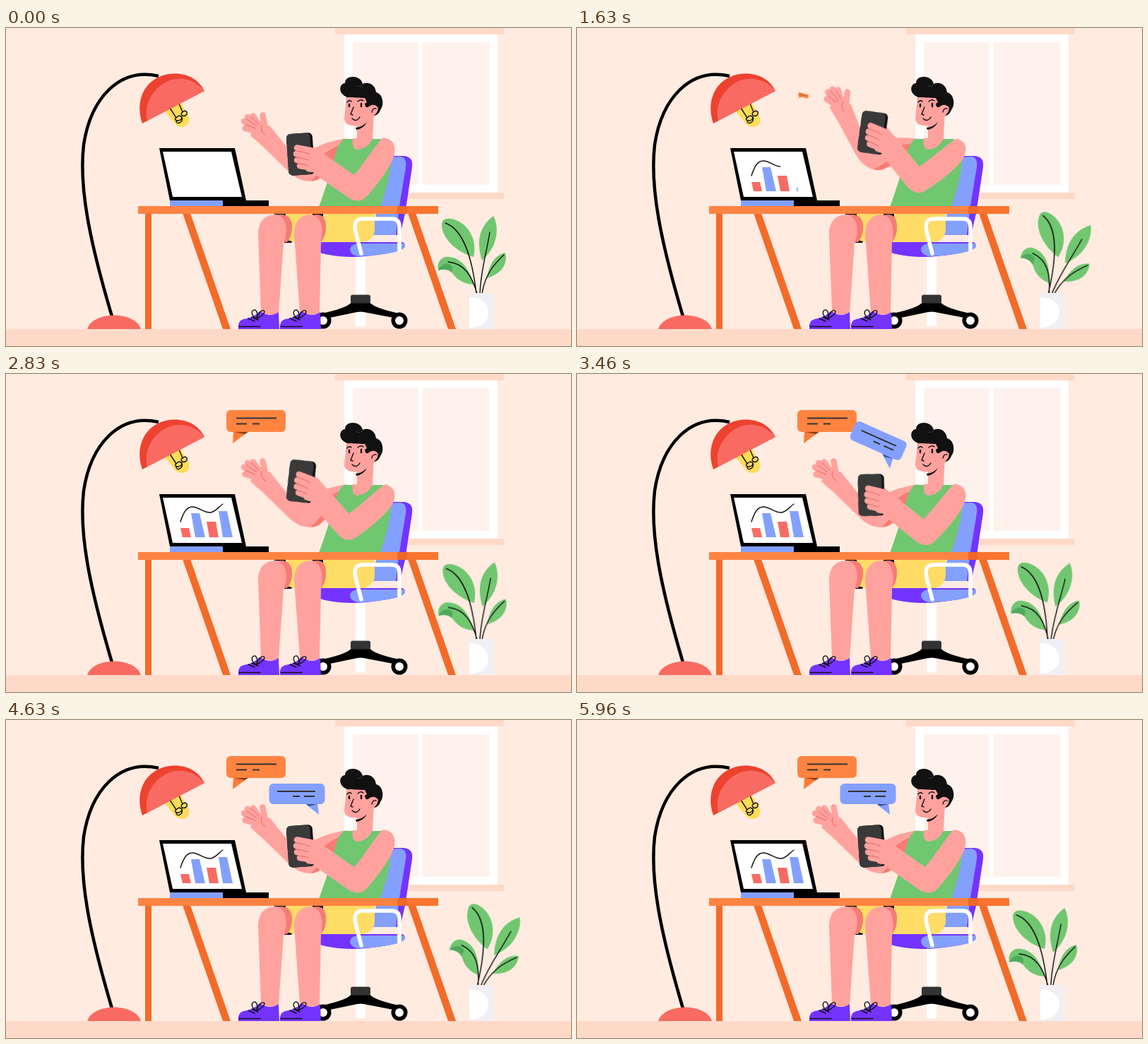
Write an HTML page without scripts that moves like this. It is 800 px wide and 450 px high and loops after 6040 ms.

```html
<!DOCTYPE html>
<html lang="en">
<head>
<meta charset="utf-8">
<title>Working at the desk</title>
<style>
  html, body { margin: 0; width: 100%; height: 100%; overflow: hidden; background: #ffebe0; }
  svg { display: block; width: 100vw; height: 100vh; }

  .skin { fill: #ffa29e; }
  .coral { fill: #f77b74; }
  .red { fill: #f96b62; }
  .blue { fill: #84a0ff; }
  .purple { fill: #7433ff; }
  .green { fill: #70c770; }
  .peach { fill: #ffd9c7; }
  .ink { fill: none; stroke: #111; stroke-width: 1.4; stroke-linecap: round; stroke-linejoin: round; }
  .crease { fill: none; stroke: #e9635f; stroke-width: 1; stroke-linecap: round; }
  .finger { fill: none; stroke: #ffa29e; stroke-width: 8.5; stroke-linecap: round; }
  .note { fill: none; stroke: #333; stroke-width: 2; }

  .move { animation: 6.04s linear infinite both; }

  /* plant: two full swings per loop */
  #plant { transform-origin: 671px 380px; animation: sway 1.51s cubic-bezier(.37, 0, .63, 1) infinite alternate; }
  @keyframes sway { to { transform: rotate(20deg); } }

  #wave { transform-origin: 480px 170px; animation-name: wave; }
  #hold { transform-origin: 532px 172px; animation-name: hold; }
  #grip { transform-origin: 437px 187px; animation-name: grip; }
  #wave, #hold, #grip { animation-timing-function: cubic-bezier(.37, 0, .63, 1); }
  @keyframes wave {
    0%, 47.5%, 100% { transform: none; }
    24.5% { transform: rotate(18deg); }
  }
  @keyframes hold {
    0%, 65%, 100% { transform: none; }
    25%, 41.5% { transform: rotate(15.8deg); }
  }
  @keyframes grip {
    0%, 65%, 100% { transform: none; }
    25%, 41.5% { transform: rotate(-4deg); }
  }

  /* chart bars grow one after another */
  .b1 { transform-origin: 255px 231px; animation-name: bar1; }
  .b2 { transform-origin: 273px 231px; animation-name: bar2; }
  .b3 { transform-origin: 293px 231px; animation-name: bar3; }
  .b4 { transform-origin: 312px 231px; animation-name: bar4; }
  @keyframes bar1 { 0% { transform: scale(0); } 8.6%, 100% { transform: none; } }
  @keyframes bar2 { 0%, 8.6% { transform: scale(0); } 17.2%, 100% { transform: none; } }
  @keyframes bar3 { 0%, 17.2% { transform: scale(0); } 25.8%, 100% { transform: none; } }
  @keyframes bar4 { 0%, 25.8% { transform: scale(0); } 34.4%, 100% { transform: none; } }

  #trend { stroke-dasharray: 100 200; animation-name: trend; }
  @keyframes trend {
    0%, 6.4% { stroke-dashoffset: 101; }
    35.8%, 100% { stroke-dashoffset: 0; }
  }

  /* speech bubbles pop, tip over and settle */
  #say { transform-origin: 312px 99px; animation-name: say; }
  #reply { transform-origin: 443px 134px; animation-name: reply; }
  @keyframes say {
    0%, 25.6% { transform: rotate(23deg) scale(0); }
    33.6% { transform: rotate(-24deg) scale(1); }
    34.8% { transform: rotate(-31deg) scale(1); animation-timing-function: cubic-bezier(.37, 0, .63, 1); }
    46.8%, 100% { transform: rotate(0deg) scale(1); }
  }
  @keyframes reply {
    0%, 49.3% { transform: rotate(-23deg) scale(0); }
    57.3% { transform: rotate(24deg) scale(1); }
    58.5% { transform: rotate(31deg) scale(1); animation-timing-function: cubic-bezier(.37, 0, .63, 1); }
    70.9%, 100% { transform: rotate(0deg) scale(1); }
  }
</style>
</head>
<body>
<svg viewBox="0 0 800 450" preserveAspectRatio="none">
  <defs>
    <g id="shoe">
      <path class="purple" d="M329 426V420Q330 412 341 411Q351 409 359 401L368 405Q377 408 386 402L387 426Z"/>
      <path class="ink" d="M330 422.500H360M343 411L352 415M348 409L357 413M354 411C346 406 347 398 353 399Q357 402 355 411C357 402 364 397 366 401Q366 406 355 411"/>
    </g>
    <g id="wheel">
      <circle r="11.500" fill="#000"/>
      <circle r="6" fill="#fff"/>
    </g>
  </defs>

  <rect width="800" height="450" fill="#ffebe0"/>

  <g id="window">
    <rect x="479" y="9" width="217" height="224" fill="#fff"/>
    <path fill="#fff2ed" d="M491 20H584V222H491ZM590 20H685V222H590Z"/>
    <path class="peach" d="M466 0H705V9H466ZM466 233H705V242H466Z"/>
  </g>
  <rect class="peach" y="426" width="800" height="24"/>

  <g id="plant">
    <path class="green" d="M662 324C640 318 617 299 617 278C617 267 632 267 645 276C661 288 666 306 662 324Z"/>
    <path class="green" d="M674 329C667 307 667 283 690 266C698 280 698 308 674 329Z"/>
    <path class="green" d="M681 354C684 332 695 320 707 318C711 333 702 348 681 354Z"/>
    <path class="green" d="M662 363C655 336 640 322 622 324C614 326 610 334 612 343C622 340 630 343 632 347C640 358 650 362 662 363Z"/>
    <path fill="#4fa95c" d="M612 343C616 333 626 330 632 338L631 346C626 341 618 341 612 343Z"/>
    <path class="ink" d="M622 276C648 285 660 325 666 376M685 289C680 320 672 345 671 376M705 321C690 335 678 350 674 376M626 331C650 333 660 352 667 376"/>
  </g>
  <path fill="#f0f0f4" d="M656 375H690V426H656Z"/>
  <path fill="#fff" d="M656 381C692 381 692 424 656 424Z"/>

  <g id="lamp">
    <path d="M150 408C118 300 103 225 110 165C120 100 160 55 216 68" fill="none" stroke="#000" stroke-width="4.500"/>
    <path class="red" d="M115 426C123 400 183 400 191 426Z"/>
    <path d="M224 117L247 105L259 126Q261 135 254 139Q246 142 240 136Z" fill="#ffdc55"/>
    <path class="ink" d="M232 113L241 127C246 121 252 127 247 130C242 133 237 129 241 127M241 131Q241 136 246 134Q251 131 249 126M245 107L250 119C255 114 259 121 254 124C249 126 246 121 250 119"/>
    <path d="M193 135C184 110 191 82 215 70C240 58 270 66 281 89Z" fill="#ee4230"/>
    <path class="red" d="M200 131C194 107 209 83 232 74C250 68 269 74 281 89Z"/>
  </g>

  <g id="chair">
    <path class="purple" d="M545 181H563Q577 182 575 197L565 263L558 293H530Z"/>
    <path class="blue" d="M540 183L558 182Q568 183 566 197L557 252L552 293H518Z"/>
    <rect x="495" y="320" width="14" height="102" fill="#fff"/>
    <path d="M489 388H515Q520 396 557 404L559 412L512 403Q502 400 492 403L449 412L447 404Q484 396 489 388Z" fill="#000"/>
    <rect x="488" y="377.500" width="28" height="12" rx="3" fill="#333"/>
    <use href="#wheel" x="449" y="414"/>
    <use href="#wheel" x="557" y="414"/>
    <path class="purple" d="M440 303H560Q565 303 565 309Q563 315 540 319Q510 324 490 324Q455 323 440 316Z"/>
    <path class="blue" d="M498 305H560Q565 304 565 309Q563 315 540 319Q515 323 497 323Q487 320 487 313Q488 306 498 305Z"/>
  </g>

  <g id="wave" class="move">
    <path class="skin" d="M346 152Q356 161 363 167L400 203Q414 217 430 217Q441 217 448 209L483 187V156Q455 160 437 170Q418 178 406 179L374 139L357 134Z"/>
    <path class="coral" d="M483 164C463 166 457 175 445 182L452 194L432 217Q444 216 450 207L483 187Z"/>
    <circle class="skin" cx="359.500" cy="143" r="11"/>
    <path class="finger" d="M357 147L338.500 142M355 144L337 132M356 141L342 126M360 140L350 124.500M368 146L363.500 123.500"/>
    <path class="crease" d="M353 142L339 136.500M355 139L341 129M358 136L347 125.500M362 138Q359 146 367 151"/>
  </g>

  <g id="body">
    <path class="green" d="M478 157H533L550 168L546 187Q542 220 529 256H442Q456 218 465 184Q469 165 478 157Z"/>
    <path class="skin" d="M491 156Q489 172 498 172Q513 170 519 156Z"/>
    <path class="skin" d="M497 128V157L519 158L521 115Z"/>
    <path class="skin" d="M482 95L479 128Q479 137 491 138Q502 140 511 134L523 124L526 105L510 92Z"/>
    <path d="M495 141Q505 140 511 133Q507 142 496 144Z" fill="#111"/>
    <path d="M483 98C468 92 473 78 480 78C480 66 502 66 505 79C514 75 523 81 524 91C534 93 536 109 530 116C528 122 523 125 521 123L524 112Q521 106 514 111Q509 115 508 107L511 105L508 99C500 99 490 98 483 98Z" fill="#111"/>
    <path class="skin" d="M514 113Q521 105 527 113Q526 123 517 125Z"/>
    <path class="ink" d="M518 119Q519 113 524 114M483 105Q486 101 489 104M498 104Q502 100 506 103M492 112L488 122L491 123M490 128Q496 134 501 126"/>
    <path d="M486 108V111M503 107V111" stroke="#111" stroke-width="2.400" stroke-linecap="round"/>
    <path d="M497 82Q503 84 505 79" fill="none" stroke="#444" stroke-width=".8"/>

    <path d="M395 262H522V286Q520 301 505 303H396Z" fill="#ffdc66"/>
    <path d="M380 262H396V267L380 265ZM434 262H449V267L434 265ZM394 299L405 302L404 304H394Z" fill="#111"/>
    <path class="coral" d="M382 265Q402 260 405 278Q406 294 398 303H385ZM434 265Q451 260 453 278Q454 294 446 303H430Z"/>
    <path class="skin" d="M357 292C357 272 368 264 383 264C396 266 401 286 393 304L386 403Q376 409 361 402Z"/>
    <path class="skin" d="M408 292C408 272 419 264 432 264C447 266 450 286 446 304L444 403Q434 409 416 402Z"/>
    <use href="#shoe"/>
    <use href="#shoe" x="59"/>
  </g>

  <g id="desk">
    <path d="M197 262H206V426H197ZM250 262H261L318 426H307ZM569 262H580L637 426H626Z" fill="#f36b29"/>
    <rect x="187" y="252" width="425" height="11" fill="#ff8342"/>
    <rect x="568" y="252" width="44" height="11" fill="#f9742f"/>
    <rect x="554" y="252" width="14" height="11" fill="#ee6828"/>
  </g>
  <path d="M503 319L495 288Q491 270 505 270H546Q557 270 557 281V314" fill="none" stroke="#fff" stroke-width="5.500" stroke-linecap="round"/>

  <g id="laptop">
    <path d="M217 170H324L340 244H372V252H300V244H232Z" fill="#000"/>
    <path d="M222 175H319L334 239H236Z" fill="#fff"/>
    <rect class="blue" x="232" y="244" width="75" height="8"/>
    <path class="red move b1" d="M247 218H259L262 231H250Z"/>
    <path class="blue move b2" d="M262 197H274L282 231H268Z"/>
    <path class="red move b3" d="M284 209H297L301 231H288Z"/>
    <path class="blue move b4" d="M301 194H313L321 231H307Z"/>
    <path id="trend" class="ink move" pathLength="100" d="M247 209C251 197 255 188 264 188C273 188 280 197 290 196C298 194 302 187 307 184"/>
  </g>

  <g id="hold" class="move">
    <path class="skin" d="M533 155.500C546 155 554 165 549 182C545 195 526 222 511 238C504 246 495 246 486 241L440 209L424 200L432 166L447 176L493 208C505 195 522 167 533 155.500Z"/>
    <g id="grip" class="move">
      <g transform="rotate(-4 417 178)">
        <rect x="398.500" y="149" width="37" height="59" rx="6" fill="#111"/>
        <rect x="398.500" y="149" width="33.500" height="59" rx="6" fill="#3a3a3a"/>
      </g>
      <path class="skin" d="M432 169L450 179L446 206L426 203L419 190Z"/>
      <path class="finger" d="M436 174L412 169.500M432 182L411 178M432 189L412 187M434 198L416 195"/>
      <path class="crease" d="M411 174Q423 175 430 179M410 183Q421 184 428 187M413 192Q421 192 428 195"/>
    </g>
  </g>

  <g id="say" class="move">
    <rect x="312" y="51" width="84" height="31" rx="6" fill="#ff8440"/>
    <path d="M322 81L321 98L344 81Z" fill="#ff7a35"/>
    <path d="M323 82H343L338 85Z" fill="#8a3d17"/>
    <path class="note" d="M326 62.500H383M326 70.500H341M349 70.500H359"/>
  </g>
  <g id="reply" class="move">
    <rect class="blue" x="372.500" y="90" width="79" height="29" rx="6"/>
    <path class="blue" d="M423 118L443 134L441 118Z"/>
    <path d="M425 119H441L429 122Z" fill="#3f5199"/>
    <path class="note" d="M384 101H438M406 108H416M422 108H437"/>
  </g>
</svg>
</body>
</html>
```
